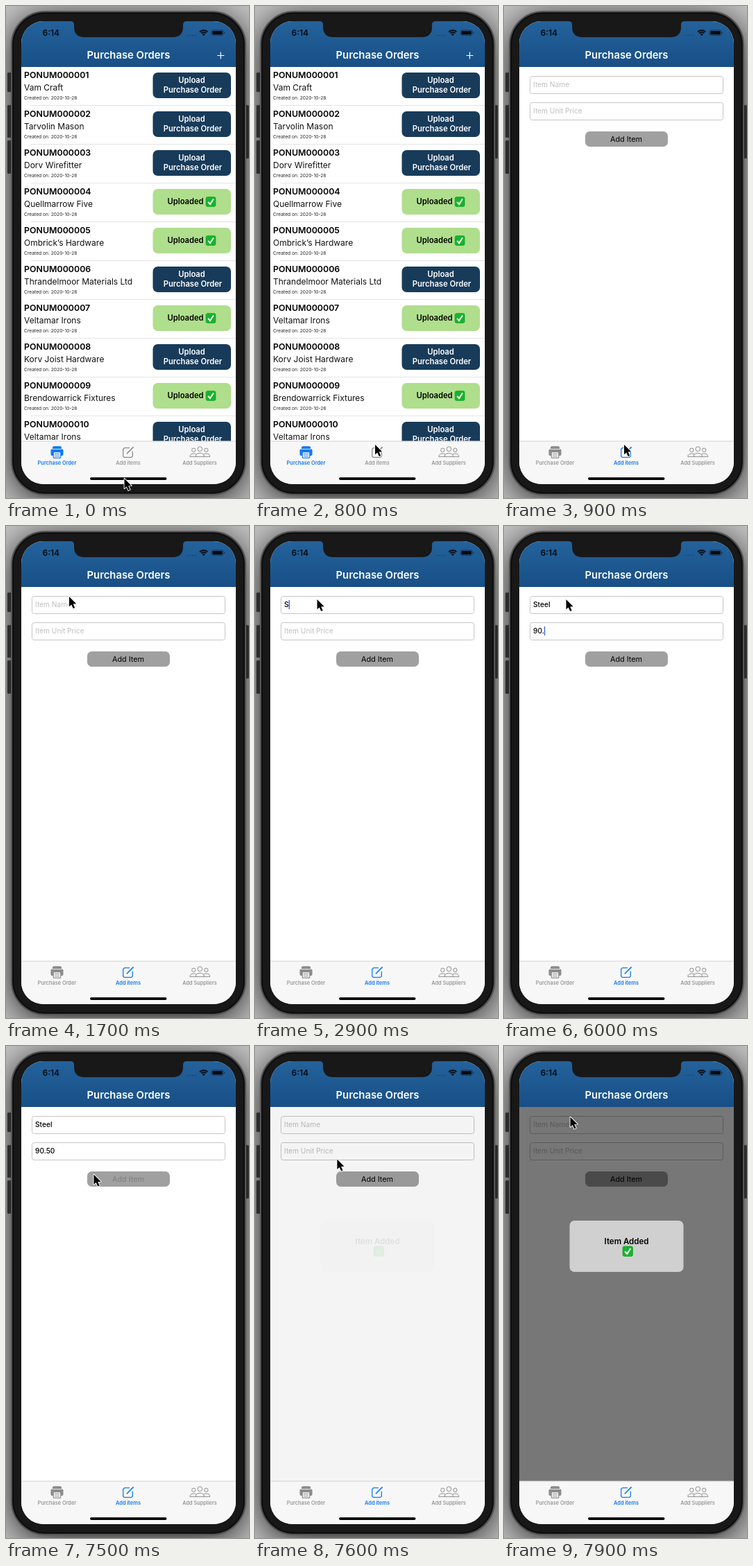
Write an HTML page with a canvas that moves like this. It is 350 px wide and 710 px high and loops after 8000 ms.

```html
<!DOCTYPE html>
<html lang="en">
<head>
<meta charset="utf-8">
<title>Purchase Orders</title>
<style>
  html, body { margin: 0; width: 100%; height: 100%; overflow: hidden; background: #c6c6c6; }
  canvas { display: block; width: 350px; height: 710px; }
</style>
</head>
<body>
<canvas id="stage"></canvas>
<script>
const LOOP = 8000;
const canvas = document.getElementById('stage');
const dpr = window.devicePixelRatio || 1;
canvas.width = 350 * dpr;
canvas.height = 710 * dpr;
const ctx = canvas.getContext('2d');

const BLUE = '#1479f0', GREY = '#8c8c8c';
const orders = [
  ['Vam Craft', 0], ['Tarvolin Mason', 0], ['Dorv Wirefitter', 0],
  ['Quellmarrow Five', 1], ['Ombrick’s Hardware', 1],
  ['Thrandelmoor Materials Ltd', 0], ['Veltamar Irons', 1],
  ['Korv Joist Hardware', 0], ['Brendowarrick Fixtures', 1], ['Veltamar Irons', 0]
];

// Pointer path: time, x, y of the tip
const path = [
  [0, 170.5, 682], [100, 170.5, 682], [800, 173, 633], [950, 173, 633],
  [1650, 91, 102], [1850, 91, 102], [2100, 89.5, 106], [6850, 89.5, 106],
  [7300, 126.5, 185.5], [7500, 126.5, 185.5], [7800, 95.5, 102.5], [8000, 95.5, 102.5]
];
const nameKeys = [2900, 3300, 3600, 3800, 4000];
const priceKeys = [5500, 5700, 5900, 6300, 6500];

const clamp = v => Math.max(0, Math.min(1, v));
const ease = v => v * v * (3 - 2 * v);
const typed = (word, keys, t) => word.slice(0, keys.filter(k => t >= k).length);

function text(s, x, y, size, weight, color, align = 'left') {
  ctx.font = `${weight} ${size}px Inter, "Open Sans", sans-serif`;
  ctx.fillStyle = color;
  ctx.textAlign = align;
  ctx.fillText(s, x, y);
}

function rect(x, y, w, h, color) {
  ctx.fillStyle = color;
  ctx.fillRect(x, y, w, h);
}

function box(x, y, w, h, r, fill, stroke, line = 1) {
  ctx.beginPath();
  ctx.roundRect(x, y, w, h, r);
  if (fill) { ctx.fillStyle = fill; ctx.fill(); }
  if (stroke) { ctx.strokeStyle = stroke; ctx.lineWidth = line; ctx.stroke(); }
}

function poly(pts, color, width = 1) {
  ctx.beginPath();
  pts.forEach(([x, y]) => ctx.lineTo(x, y));
  ctx.strokeStyle = color;
  ctx.lineWidth = width;
  ctx.stroke();
}

function circle(x, y, r, fill, stroke, line = 1) {
  ctx.beginPath();
  ctx.arc(x, y, r, 0, Math.PI * 2);
  if (fill) { ctx.fillStyle = fill; ctx.fill(); }
  if (stroke) { ctx.strokeStyle = stroke; ctx.lineWidth = line; ctx.stroke(); }
}

function check(x, y, s) {
  box(x, y, s, s, 2.5, '#16b52c', '#0f9a22', 0.6);
  poly([[x + s * .22, y + s * .52], [x + s * .43, y + s * .76], [x + s * .78, y + s * .22]], '#fff', s * .14);
}

function drawPhone() {
  rect(0, 0, 350, 710, '#c6c6c6');
  ctx.save();
  ctx.shadowColor = 'rgba(0,0,0,.85)';
  ctx.shadowBlur = 50 * dpr;
  ctx.shadowOffsetY = 8 * dpr;
  box(8, 8, 337, 697, 48, '#181818');
  ctx.restore();
  for (const [x, y, h] of [[2, 96, 28], [2, 143, 47], [2, 194, 48], [344, 143, 77]])
    box(x, y, 6, h, 1.5, '#2b2b2b', '#555', 0.6);
  box(8, 8, 337, 697, 48, '#181818', '#565656', 2);
  box(10.5, 10.5, 332, 692, 46, null, '#0c0c0c', 1.5);
}

function drawNotch() {
  ctx.beginPath();
  ctx.moveTo(93, 21);
  ctx.lineTo(260, 21);
  ctx.lineTo(260, 22);
  ctx.quadraticCurveTo(255, 22, 255, 27);
  ctx.lineTo(255, 30);
  ctx.quadraticCurveTo(255, 45, 240, 45);
  ctx.lineTo(113, 45);
  ctx.quadraticCurveTo(98, 45, 98, 30);
  ctx.lineTo(98, 27);
  ctx.quadraticCurveTo(98, 22, 93, 22);
  ctx.fillStyle = '#181818';
  ctx.fill();
}

function drawHeader(list) {
  const g = ctx.createLinearGradient(0, 22, 0, 88);
  g.addColorStop(0, '#24629b');
  g.addColorStop(1, '#184f86');
  rect(22, 22, 309, 66, g);
  text('6:14', 52.5, 43.3, 12, 600, '#050a10');
  for (let i = 0; i < 4; i++) circle(262 + i * 3.5, 42.5, 0.8, '#123b63');
  // Wi-Fi fan
  for (const r of [8, 5.2]) {
    ctx.beginPath();
    ctx.arc(284.7, 43, r, -Math.PI * .75, -Math.PI * .25);
    ctx.strokeStyle = '#050a10';
    ctx.lineWidth = 1.8;
    ctx.stroke();
  }
  ctx.beginPath();
  ctx.moveTo(284.7, 43);
  ctx.arc(284.7, 43, 3, -Math.PI * .75, -Math.PI * .25);
  ctx.fillStyle = '#050a10';
  ctx.fill();
  box(296, 34.8, 17, 7.6, 2.2, null, '#12314f', 0.8);
  box(297.3, 36, 14.4, 5.2, 1.2, '#050a10');
  rect(314, 37.4, 1, 2.4, '#12314f');
  text('Purchase Orders', 176.5, 76.2, 14.8, 600, '#fff', 'center');
  if (list) {
    poly([[304.3, 71.5], [314.3, 71.5]], '#fff', 1.2);
    poly([[309.3, 66.5], [309.3, 76.5]], '#fff', 1.2);
  }
}

function drawList() {
  orders.forEach(([name, done], i) => {
    const y = 88 + i * 56;
    text('PONUM' + String(i + 1).padStart(6, '0'), 26, y + 16.4, 12.4, 600, '#000');
    text(name, 26, y + 34, 12, 400, '#111');
    text('Created on: 2020-10-28', 26, y + 46.8, 6.7, 400, '#222');
    rect(36, y + 55, 295, 1, '#e4e4e4');
    box(211.5, y + 8, 112.5, 37, 7, done ? '#afde8d' : '#183b5a');
    if (done) {
      text('Uploaded', 232.5, y + 30.3, 11.2, 600, '#000');
      check(288, y + 187 - 180 + 12.5, 14);
    } else {
      text('Upload', 267.5, y + 23.2, 11.2, 600, '#fff', 'center');
      text('Purchase Order', 269, y + 36.9, 11.2, 600, '#fff', 'center');
    }
  });
}

function drawField(y, hint, value) {
  box(37.5, y + .5, 278, 25, 3, '#fff', '#c6c6c6');
  if (value) text(value, 42, y + 16.4, 10.2, 450, '#000');
  else text(hint, 42, y + 16.4, 10.2, 400, '#bebebe');
}

function caret(value, y, alpha) {
  ctx.font = '450 10.2px Inter, "Open Sans", sans-serif';
  const x = 42 + ctx.measureText(value).width;
  ctx.globalAlpha = alpha;
  rect(x, y + 6, 1.4, 13, '#3d68d0');
  ctx.globalAlpha = 1;
}

function drawForm(t) {
  const reset = t >= 7600;
  const name = reset ? '' : typed('Steel', nameKeys, t);
  const price = reset ? '' : typed('90.50', priceKeys, t);
  const pressed = t >= 7450 && t < 7600;
  drawField(101, 'Item Name', name);
  drawField(139, 'Item Unit Price', price);
  if (t >= 2100 && t < 4500) caret(name, 101, 1);
  if (t >= 4500 && t < 6700) caret(price, 139, 1 - clamp((t - 6550) / 150));
  box(117, 181, 119, 22, 6.5, '#a0a0a0');
  text('Add Item', 176, 196, 10.8, 400, pressed ? '#7e7e7e' : '#000', 'center');

  const fade = clamp((t - 7580) / 270);
  if (!fade) return;
  rect(22, 88, 309, 540, `rgba(0,0,0,${.533 * fade})`);
  ctx.globalAlpha = fade;
  box(94.5, 252, 164, 74, 7, '#d0d0d0');
  text('Item Added', 176.5, 286.3, 11.5, 600, '#000', 'center');
  check(171, 289, 14.5);
  ctx.globalAlpha = 1;
}

function printer(c) {
  box(67, 635.2, 13, 4, [2, 2, 0, 0], c);
  box(64.5, 639.2, 18, 9.8, 2, c);
  rect(66.5, 639, 14, .8, '#f7f7f7');
  box(68.2, 643.6, 10.6, 8.6, 1, '#f7f7f7', c, 1.2);
  rect(70, 646, 7, 1, c);
  rect(70, 648.8, 7, 1, c);
}

function compose(c) {
  ctx.lineJoin = 'round';
  poly([[178, 637.7], [170.5, 637.7], [168.7, 639.5], [168.7, 649.8], [170.3, 651.4],
        [180.7, 651.4], [182.3, 649.8], [182.3, 642.5]], c, 1.3);
  poly([[183.6, 636.3], [175, 645], [173.9, 646.2]], c, 1.7);
}

function person(x, y, r, w, c) {
  circle(x, y, r, null, c, 1);
  ctx.beginPath();
  ctx.moveTo(x - w, 650.3);
  ctx.bezierCurveTo(x - w, y + r + 1, x + w, y + r + 1, x + w, 650.3);
  ctx.closePath();
  ctx.fillStyle = '#f7f7f7';
  ctx.fill();
  ctx.stroke();
}

function drawTabs(active) {
  rect(22, 628, 309, 62, '#f7f7f7');
  rect(22, 627.5, 309, 1, '#d2d2d2');
  const color = i => i === active ? BLUE : GREY;
  printer(color(0));
  compose(color(1));
  person(270.3, 640.8, 2.7, 5.6, GREY);
  person(288.3, 640.8, 2.7, 5.6, GREY);
  person(279.3, 639.2, 3.3, 6.2, GREY);
  [['Purchase Order', 73.5], ['Add items', 176], ['Add Suppliers', 279]].forEach(([s, x], i) =>
    text(s, x, 661.7, 7.4, i === active ? 600 : 500, color(i), 'center'));
  box(121, 680.3, 110.5, 3.6, 1.8, '#000');
}

function drawPointer(t) {
  let i = 1;
  while (i < path.length - 1 && t > path[i][0]) i++;
  const [t0, x0, y0] = path[i - 1], [t1, x1, y1] = path[i];
  const k = ease(clamp((t - t0) / (t1 - t0)));
  ctx.save();
  ctx.translate(x0 + (x1 - x0) * k, y0 + (y1 - y0) * k);
  ctx.beginPath();
  for (const [x, y] of [[0, 0], [0, 14.3], [3.2, 11.4], [5.8, 17], [8.2, 15.9], [5.7, 10.4], [10.2, 10.2]])
    ctx.lineTo(x, y);
  ctx.closePath();
  ctx.lineJoin = 'round';
  ctx.strokeStyle = '#fff';
  ctx.lineWidth = 1.8;
  ctx.stroke();
  ctx.fillStyle = '#000';
  ctx.fill();
  ctx.restore();
}

function draw(t) {
  const list = t < 900;
  ctx.setTransform(dpr, 0, 0, dpr, 0, 0);
  drawPhone();
  ctx.save();
  ctx.beginPath();
  ctx.roundRect(22, 22, 309, 668, 32);
  ctx.clip();
  rect(22, 22, 309, 668, '#fff');
  if (list) drawList(); else drawForm(t);
  drawHeader(list);
  drawTabs(list ? 0 : 1);
  drawNotch();
  ctx.restore();
  drawPointer(t);
}

const start = performance.now();
function tick() {
  draw((performance.now() - start) % LOOP);
  requestAnimationFrame(tick);
}
tick();
</script>
</body>
</html>
```
